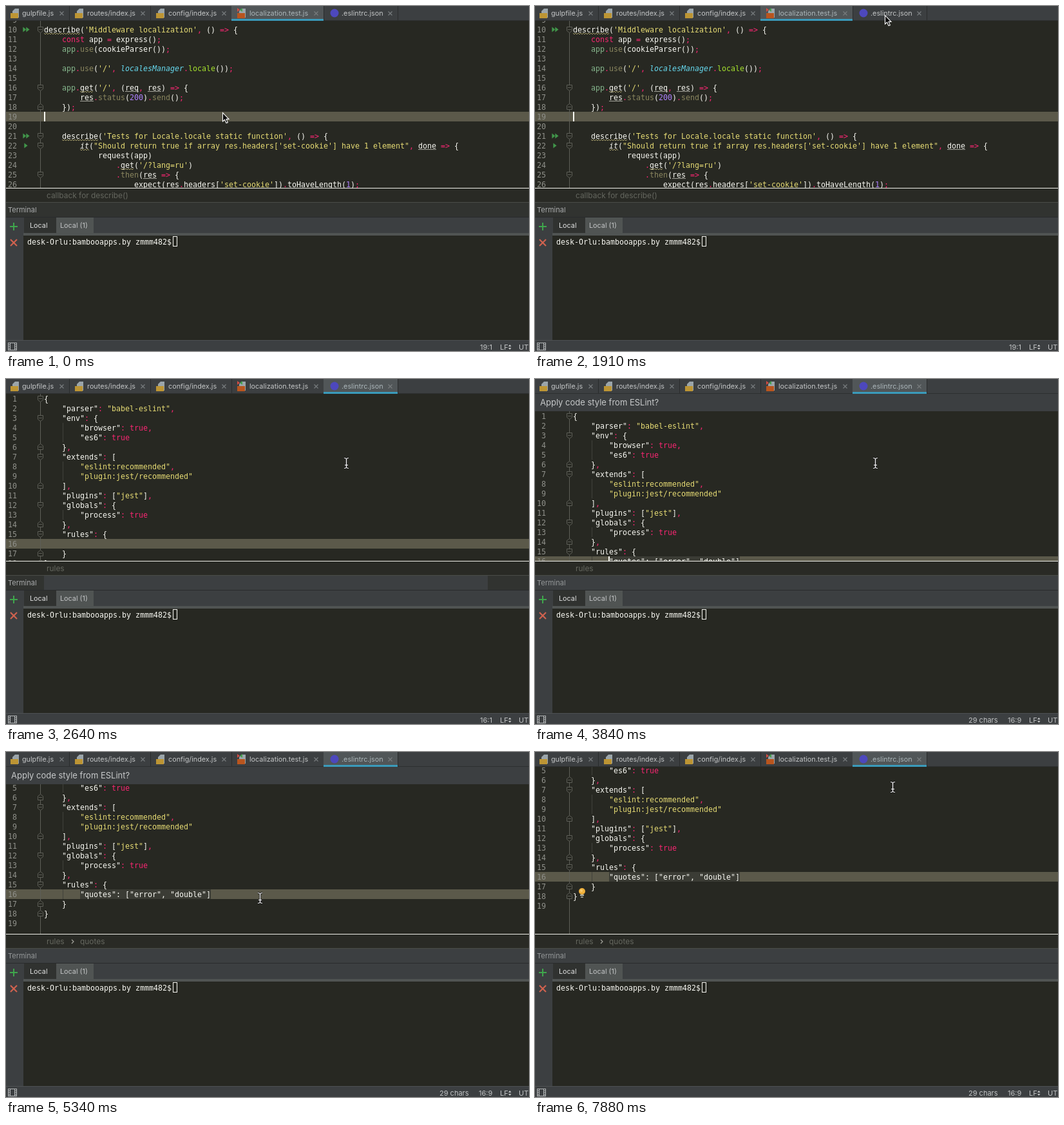
An HTML page with a canvas for the animation above (8000 ms loop, 812 by 535 pixels).

```html
<!DOCTYPE html>
<html lang="en">
<head>
<meta charset="utf-8">
<title>Editor</title>
<style>
html, body { margin: 0; width: 100%; height: 100%; overflow: hidden; background: #272822; }
canvas { display: block; }
</style>
</head>
<body>
<canvas id="stage" width="812" height="535"></canvas>
<script>
const ctx = document.getElementById('stage').getContext('2d');
const LOOP = 8000, W = 812, CHAR = 7, ROW = 15, CODE_X = 59;
const MONO = '11.63px "DejaVu Sans Mono", monospace';
const C = {
  editor: '#272822', panel: '#3c3f41', active: '#515658', row: '#5b594a', selection: '#3b3c35',
  white: '#f8f8f2', yellow: '#e6db74', pink: '#f92672', lime: '#a6e22e', cyan: '#66d9ef',
  purple: '#ae81ff', olive: '#8a865f', sage: '#85b58c', number: '#8f908a', fold: '#5d5e57', ui: '#c3c5c6'
};
const WORDS = {
  const: C.pink, true: C.pink, use: C.olive, status: C.olive, send: C.olive, then: C.olive,
  locale: C.lime, localesManager: C.cyan
};

// "~" marks a wavy underline, "^" a straight one.
const testFile = {
  first: 9, last: 26, starts: [10, 16, 21, 22, 25], ends: [18], runs: { 10: 2, 21: 2, 22: 1 },
  lines: `
~describe('Middleware localization', () => {
    const app = express();
    app.use(cookieParser());

    app.use('/', localesManager.locale());

    app.~get('/', (^req, ^res) => {
        ^res.status(200).send();
    });


    ~describe('Tests for Locale.locale static function', () => {
        ~it("Should return true if array res.headers['set-cookie'] have 1 element", ^done => {
            request(app)
                .~get('/?lang=ru')
                .then(^res => {
                    expect(res.headers['set-cookie']).toHaveLength(1);`.split('\n')
};
const configFile = {
  first: 1, last: 19, starts: [1, 3, 7, 12, 15], ends: [6, 10, 14, 17, 18], runs: {}, guides: true,
  lines: `{
    "parser": "babel-eslint",
    "env": {
        "browser": true,
        "es6": true
    },
    "extends": [
        "eslint:recommended",
        "plugin:jest/recommended"
    ],
    "plugins": ["jest"],
    "globals": {
        "process": true
    },
    "rules": {

    }
}
`.split('\n')
};
const RULE = '        "quotes": ["error", "double"]';

const tabs = [
  [0, 98, 'gulpfile.js'], [98, 224, 'routes/index.js'], [224, 350, 'config/index.js'],
  [350, 493, 'localization.test.js'], [493, 608, '.eslintrc.json']
];

// Stepped tracks: each value holds until the next time.
const pointer = [
  [0, 'arrow', 336, 165], [140, 'arrow', 362, 148], [290, 'arrow', 428, 100], [430, 'arrow', 506, 44],
  [580, 'arrow', 543, 18], [880, 'arrow', 545, 18], [1030, 'arrow', 546, 17], [1910, 'arrow', 543, 14],
  [2340, 'arrow', 541, 20], [2490, 'beam', 532, 88], [2640, 'beam', 528, 130],
  [4590, 'beam', 505, 146], [4740, 'beam', 452, 184], [4890, 'beam', 408, 216], [5040, 'beam', 394, 226],
  [6240, 'none', 0, 0], [7440, 'beam', 563, 60], [7590, 'beam', 560, 56], [7740, 'beam', 557, 54],
  [7880, 'beam', 555, 54]
];
const caret = [
  [0, 1], [140, 0], [580, 1], [1030, 0], [1610, 1], [2060, 0], [3090, 1], [3540, 0],
  [3840, 1], [5340, 0], [6540, 1], [6690, 0], [7140, 1], [7590, 0]
];
const scroll = [[0, 0], [5190, 30], [5340, 62]];
const bulb = [[0, 0], [4590, 279], [5190, 0], [6540, 217]];

function hold(track, t) {
  return track.filter(key => key[0] <= t).pop().slice(1);
}
function rect(x, y, w, h, color) {
  ctx.fillStyle = color;
  ctx.fillRect(x, y, w, h);
}
function label(text, x, y, size, color) {
  ctx.font = `${size}px Inter, sans-serif`;
  ctx.fillStyle = color;
  ctx.fillText(text, x, y);
}
function path(points, fill, stroke, width = 1, closed = true) {
  ctx.beginPath();
  points.forEach(([x, y]) => ctx.lineTo(x, y));
  if (closed) ctx.closePath();
  if (fill) { ctx.fillStyle = fill; ctx.fill(); }
  if (stroke) { ctx.strokeStyle = stroke; ctx.lineWidth = width; ctx.stroke(); }
}
function disc(x, y, r, color) {
  ctx.beginPath();
  ctx.arc(x, y, r, 0, 7);
  ctx.fillStyle = color;
  ctx.fill();
}
function cross(x, y, r, color, width) {
  path([[x - r, y - r], [x + r, y + r]], null, color, width, false);
  path([[x - r, y + r], [x + r, y - r]], null, color, width, false);
}

function tokenColor(token, next) {
  if (/^["']/.test(token)) return next === ':' ? C.white : C.yellow;
  if (/^\d/.test(token)) return C.purple;
  if (/^([.,;:=]|=>)$/.test(token)) return C.pink;
  if (token === 'app' && next === '.') return C.sage;
  return WORDS[token] || C.white;
}
function drawCode(line, top, plain) {
  let marks = 0;
  for (const match of line.matchAll(/"[^"]*"|'[^']*'|[~^]?\w+|=>|\S/g)) {
    const mark = /^[~^]\w/.test(match[0]) ? match[0][0] : '';
    const token = match[0].slice(mark.length);
    const x = CODE_X + CHAR * (match.index - marks);
    const width = CHAR * token.length;
    marks += mark.length;
    ctx.font = (/^(it|localesManager)$/.test(token) ? 'italic ' : '') + MONO;
    ctx.fillStyle = plain ? C.white : tokenColor(token, line[match.index + match[0].length]);
    ctx.fillText(token, x, top + 12);
    if (mark === '^') rect(x, top + 13, width, 1, '#a5a59c');
    if (mark === '~') {
      const wave = Array.from({ length: width / 2 + 1 }, (_, i) => [x + i * 2, top + 13 + i % 2 * 2]);
      path(wave, null, '#a39b68', 1, false);
    }
  }
}
function drawFold(top, flip) {
  const y = top + 7.5, s = flip ? -1 : 1;
  path([[49.5, y - 4 * s], [57.5, y - 4 * s], [57.5, y + 2 * s], [53.5, y + 5 * s], [49.5, y + 2 * s]], C.editor, C.fold);
  rect(51, top + 7, 5, 1, C.fold);
}
function drawEditor(file, state) {
  const { top, origin, current, pasted, caretOn } = state;
  const rowTop = n => origin + (n - 1) * ROW;
  ctx.save();
  ctx.beginPath();
  ctx.rect(0, top, W, 282 - top);
  ctx.clip();
  rect(0, rowTop(current), W, ROW, C.row);
  if (pasted) rect(115, rowTop(16), 203, ROW, C.selection);
  rect(53, top, 1, 260, C.fold);
  for (let n = file.first; n <= file.last; n++) {
    const y = rowTop(n), selected = pasted && n === 16;
    const line = selected ? RULE : file.lines[n - file.first] || '';
    ctx.font = MONO;
    ctx.fillStyle = C.number;
    ctx.textAlign = 'right';
    ctx.fillText(n, 17, y + 12);
    ctx.textAlign = 'left';
    if (file.guides && line.startsWith('        ')) rect(88, y, 1, ROW, '#41423b');
    drawCode(line, y, selected);
    if (file.starts.includes(n)) drawFold(y, false);
    if (file.ends.includes(n)) drawFold(y, true);
    for (let i = 0; i < file.runs[n]; i++) {
      const x = (file.runs[n] === 2 ? 26 : 28) + i * 5;
      path([[x, y + 3], [x + 6, y + 7.5], [x, y + 12]], '#41964a', C.editor, 0.6);
    }
  }
  if (caretOn) rect(pasted ? 114 : 59, rowTop(current), 2, ROW, C.white);
  ctx.restore();
}

function drawTabs(active) {
  rect(0, 0, W, 23, C.panel);
  tabs.forEach(([left, right, name], i) => {
    const on = i === active;
    if (on) {
      rect(left, 0, right - left, 23, C.active);
      rect(left, 20, right - left, 3, '#3a9bbb');
    }
    rect(right, 0, 1, 22, '#2a2c2d');
    if (i === 4) disc(510, 11, 6.5, '#4d48bd');
    else {
      const x = left + (i ? 9 : 7);
      path([[x + 7, 4], [x + 13, 4], [x + 13, 18], [x + 3, 18], [x + 3, 8]], '#9ba5aa');
      rect(x, 11, 12, 8, i === 3 ? '#b9551e' : '#bd9534');
      if (i === 3) {
        path([[x, 3], [x + 4, 6], [x, 9]], '#d44b43');
        path([[x + 8, 3], [x + 4, 6], [x + 8, 9]], '#45a04e');
      }
    }
    label(name, left + (i ? 28 : 25), 15, 10.8, on ? '#abb6ba' : C.ui);
    cross(right - 11.5, 11.5, 3, '#777b7d', 1.2);
  });
  rect(0, 22, active === 3 ? 350 : 493, 1, '#2d2f30');
  rect(active === 3 ? 493 : 608, 22, W, 1, '#2d2f30');
}

function drawPanels(t, config, pasted) {
  rect(0, 282, W, 1, '#eeeee8');
  rect(0, 283, W, 21, '#292a25');
  const crumb = '#65675f';
  label(config ? 'rules' : 'callback for describe()', 63, 298, 11.9, crumb);
  if (t >= 3990) {
    path([[102, 291], [105, 294], [102, 297]], null, '#a3a49c', 1.2, false);
    label('quotes', 115, 298, 11.9, crumb);
  }
  rect(0, 304, W, 1, '#4a4c48');
  rect(0, 305, W, 22, pasted ? C.panel : '#313330');
  if (config && !pasted) rect(59, 305, 689, 22, C.panel);
  label('Terminal', 3, 320, 11, pasted ? '#959899' : '#a9abac');
  rect(0, 327, W, 1, '#292b2c');

  rect(0, 328, W, 24, C.panel);
  rect(28, 328, 50, 24, '#303230');
  rect(78, 328, 58, 24, '#505453');
  rect(27, 352, W, 4, '#505453');
  label('Local', 37, 344, 10.8, '#e0e1e1');
  label('Local (1)', 84, 344, 10.8, C.ui);
  rect(27, 356, W, 162, C.editor);
  rect(0, 352, 27, 166, C.panel);
  rect(6, 341, 12, 2, '#3fa64c');
  rect(11, 336, 2, 12, '#3fa64c');
  cross(12, 367, 5, '#d0624f', 2.2);
  ctx.font = MONO;
  ctx.fillStyle = C.white;
  ctx.fillText('desk-Orlu:bambooapps.by zmmm482$', 33, 370);
  ctx.strokeStyle = C.white;
  ctx.lineWidth = 1;
  ctx.strokeRect(259.5, 357.5, 6, 15);

  rect(0, 518, W, 17, C.panel);
  rect(0, 518, W, 1, '#4d5052');
  ctx.strokeStyle = '#b3b6b7';
  ctx.strokeRect(3.5, 522.5, 13, 11);
  ctx.strokeRect(6.5, 522.5, 7, 11);
  for (let y = 525; y < 533; y += 3) { rect(4, y, 2, 1, '#b3b6b7'); rect(14, y, 2, 1, '#b3b6b7'); }
  if (pasted) label('29 chars', 673, 533, 11, C.ui);
  label(pasted ? '16:9' : config ? '16:1' : '19:1', pasted ? 734 : 736, 533, 11, C.ui);
  label('LF', 767, 533, 11, C.ui);
  path([[780, 528], [784.5, 528], [782.25, 525]], C.ui);
  path([[780, 530], [784.5, 530], [782.25, 533]], C.ui);
  label('UTF-8', 796, 533, 11, C.ui);
}

function drawBulb(y) {
  disc(73, y - 1, 5, '#f0b13c');
  disc(72, y - 2, 2, '#f8cc70');
  rect(70, y + 4, 6, 2, '#b9b9ae');
  rect(71, y + 7, 4, 2, '#92938a');
}
function drawPointer(kind, x, y) {
  if (kind === 'arrow') {
    path([[0.5, 0.5], [0.5, 14], [3.6, 11.2], [6, 16.6], [8.3, 15.6], [6, 10.4], [10, 10.4]]
      .map(([dx, dy]) => [x + dx, y + dy]), '#000', '#fff', 1.1);
  } else if (kind === 'beam') {
    const halves = [[-3.5, -8], [-1, -7.5], [0, -6], [0, 6], [-1, 7.5], [-3.5, 8]];
    for (const [color, width] of [['#111', 3], ['#f4f4f4', 1.2]]) {
      for (const side of [1, -1]) {
        path(halves.map(([dx, dy]) => [x + 0.5 + dx * side, y + 0.5 + dy]), null, color, width, false);
      }
      path([[x - 2, y + 3.5], [x + 3, y + 3.5]], null, color, width, false);
    }
  }
}

function draw(t) {
  const config = t >= 2200, pasted = t >= 3840;
  const banner = pasted && t < 6990;
  const top = banner ? 50 : 23;
  rect(0, 0, W, 535, C.editor);
  drawEditor(config ? configFile : testFile, {
    top, pasted,
    origin: config ? top - hold(scroll, t)[0] : -106,
    current: config ? 16 : 19,
    caretOn: hold(caret, t)[0]
  });
  drawTabs(config ? 4 : 3);
  if (banner) {
    rect(0, 23, W, 27, C.panel);
    label('Apply code style from ESLint?', 8, 41, 13, '#c6c8c9');
  }
  drawPanels(t, config, pasted);
  const [bulbY] = hold(bulb, t);
  if (bulbY) drawBulb(bulbY);
  drawPointer(...hold(pointer, t));
}

const start = performance.now();
function tick() {
  draw((performance.now() - start) % LOOP);
  requestAnimationFrame(tick);
}
tick();
</script>
</body>
</html>
```
